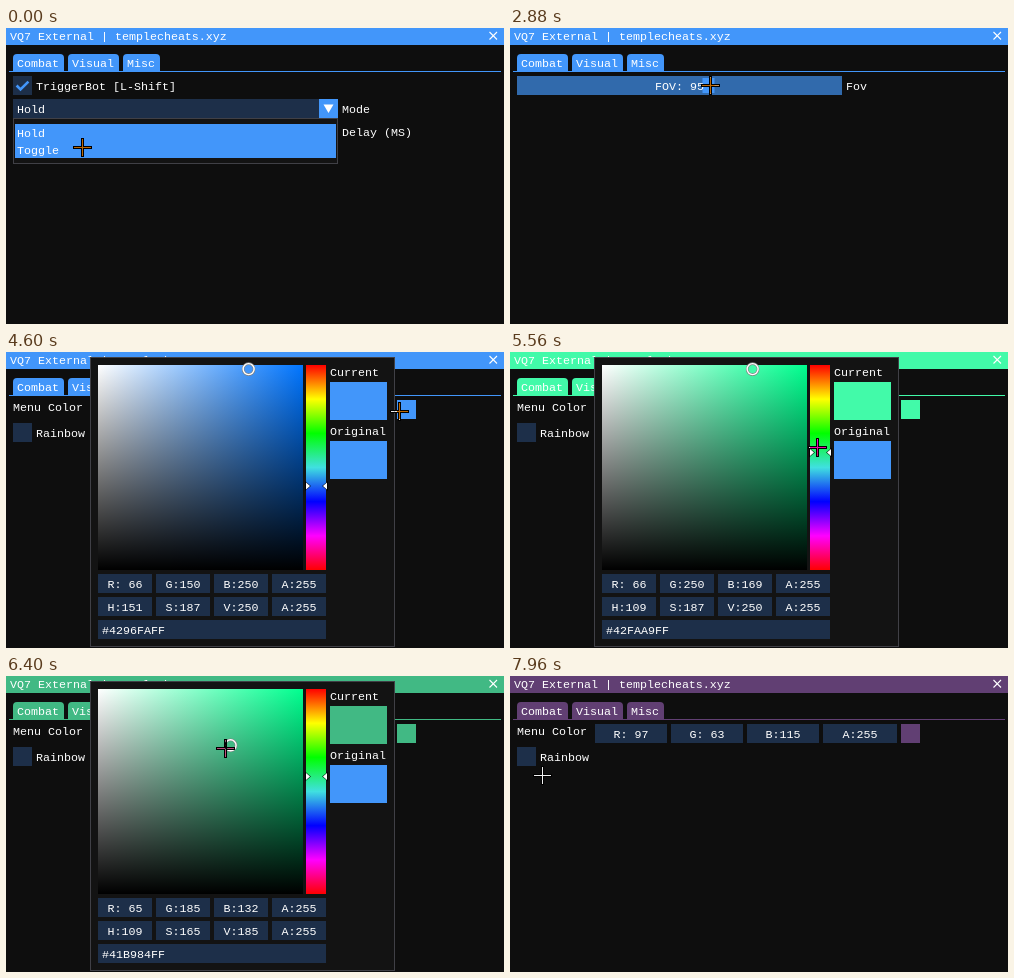
Animation of 498 by 296 pixels, one loop 8000 ms. Source, as an HTML page with a canvas:

```html
<!DOCTYPE html>
<html lang="en">
<head>
<meta charset="utf-8">
<title>Settings menu</title>
<style>
html, body { margin: 0; width: 100%; height: 100%; overflow: hidden; background: #0e0e0e; }
canvas { display: block; }
</style>
</head>
<body>
<canvas id="stage" width="498" height="296"></canvas>
<script>
const ctx = document.getElementById('stage').getContext('2d');
const LOOP = 8000;
const BG = '#0e0e0e', POPUP = '#131313', BORDER = '#404046';
const FRAME = '#1d2f49', HOVER = '#24456d', ACTIVE = '#316aac';
const ROW = 19, STEP = 23, CHAR = 7;
const SV = { x: 92, y: 13, size: 205 };
const BASE_HSV = [.5903, .7347, .98];

// Pointer visits: arrival time, x, y. Each move takes at most TRAVEL ms.
const TRAVEL = 400;
const VISITS = [
  [0, 77, 120], [400, 62, 105], [960, 19, 52], [1600, 86, 34],
  [2160, 150, 58], [2600, 262, 60], [2880, 200, 57], [3320, 136, 35],
  [4360, 393, 59], [5400, 310, 134], [5520, 308, 100.5], [5560, 307, 95.5],
  [6000, 242.6, 17.1], [6360, 224.6, 69.3], [6400, 220, 72], [6700, 184.7, 125.5],
  [7000, 310, 100.5], [7320, 310, 172], [7880, 36, 113], [7960, 32, 99]
];
const DRAGS = [
  { part: 'hue', from: 5400, to: 5520 },
  { part: 'sv', from: 6000, to: 6700 },
  { part: 'hue', from: 7000, to: 7320 }
];
const LAG = 40;
const TIMES = { choose: 400, uncheck: 1040, visual: 1600, grab: 2160, release: 2920,
                misc: 3320, open: 4360, close: 7860 };

const clamp = (v, lo, hi) => Math.max(lo, Math.min(hi, v));

function pointerAt(t) {
  const i = VISITS.findIndex(v => v[0] > t);
  const [t1, x1, y1] = VISITS[i < 0 ? VISITS.length - 1 : i];
  if (i <= 0) return { x: x1, y: y1 };
  const [t0, x0, y0] = VISITS[i - 1];
  const span = Math.min(TRAVEL, t1 - t0);
  const u = clamp((t - t1 + span) / span, 0, 1);
  const e = u * u * (3 - 2 * u);
  return { x: x0 + (x1 - x0) * e, y: y0 + (y1 - y0) * e };
}

// The colour follows the pointer through every drag so far.
function colorAt(t) {
  let [h, s, v] = BASE_HSV;
  for (const { part, from, to } of DRAGS) {
    if (t - LAG < from) break;
    const p = pointerAt(Math.min(t - LAG, to));
    const down = clamp((p.y - SV.y) / SV.size, 0, 1);
    if (part === 'hue') h = down;
    else [s, v] = [clamp((p.x - SV.x) / SV.size, 0, 1), 1 - down];
  }
  return [h, s, v];
}

function hsvToRgb(h, s, v) {
  return [5, 3, 1].map(n => {
    const k = (n + h * 6) % 6;
    return Math.round(255 * (v - v * s * clamp(Math.min(k, 4 - k), 0, 1)));
  });
}

const css = rgb => `rgb(${rgb})`;
const BASE = css(hsvToRgb(...BASE_HSV));

function rect(x, y, w, h, fill) {
  ctx.fillStyle = fill;
  ctx.fillRect(x, y, w, h);
}

function panel(x, y, w, h) {
  rect(x, y, w, h, BORDER);
  rect(x + 1, y + 1, w - 2, h - 2, POPUP);
}

function text(str, x, y) {
  ctx.fillStyle = '#fff';
  ctx.fillText(str, x, y);
}

function line(points, color, width) {
  ctx.beginPath();
  points.forEach(([x, y]) => ctx.lineTo(x, y));
  ctx.strokeStyle = color;
  ctx.lineWidth = width;
  ctx.stroke();
}

// Triangle with its tip at x + dx, y + dy.
function arrow(x, y, dx, dy, half, fill) {
  const nx = dy ? half : 0, ny = dx ? half : 0;
  ctx.beginPath();
  ctx.moveTo(x - nx, y - ny);
  ctx.lineTo(x + dx, y + dy);
  ctx.lineTo(x + nx, y + ny);
  ctx.fillStyle = fill;
  ctx.fill();
}

function field(x, y, w, label, fill = FRAME) {
  rect(x, y, w, ROW, fill);
  text(label, x + (w - label.length * CHAR) / 2, y + 14);
}

function slider(y, label, value, ratio, ui, held) {
  rect(7, y, 325, ROW, held ? ACTIVE : ui.over(7, y, 325, ROW) ? HOVER : FRAME);
  rect(9 + ratio * 309, y + 2, 12, ROW - 4, ui.color);
  text(value, 169.5 - value.length * CHAR / 2, y + 14);
  text(label, 336, y + 14);
}

function checkbox(y, label, on, ui) {
  rect(7, y, ROW, ROW, ui.over(7, y, ROW, ROW) ? HOVER : FRAME);
  if (on) line([[10.6, y + 9.5], [14.5, y + 13.4], [22.4, y + 5.6]], ui.color, 2.6);
  text(label, 30, y + 14);
}

function drawWindow(ui) {
  rect(0, 0, 498, 296, BG);
  rect(0, 0, 498, 17, ui.color);
  text('VQ7 External | templecheats.xyz', 4, 12);
  line([[483.5, 4], [491, 11.5]], '#fff', 1.1);
  line([[491, 4], [483.5, 11.5]], '#fff', 1.1);

  let x = 7;
  for (const name of ['Combat', 'Visual', 'Misc']) {
    const w = name.length * CHAR + 9;
    ctx.beginPath();
    ctx.roundRect(x, 26, w, 17, [4, 4, 0, 0]);
    ctx.fillStyle = ui.color;
    ctx.fill();
    text(name, x + 4, 39);
    x += w + 4;
  }
  rect(3, 43, 492, 1, ui.color);
}

function drawCombat(t, ui) {
  const enabled = t < TIMES.uncheck;
  checkbox(48, 'TriggerBot [L-Shift]', enabled, ui);
  rect(7, 71, 325, ROW, FRAME);
  rect(313, 71, ROW, ROW, ui.color);
  arrow(322.5, 76.5, 0, 8.5, 5, '#fff');
  text('Hold', 11, 85);
  text('Mode', 336, 85);
  if (enabled) slider(94, 'Delay (MS)', 'Delay: 0', 0, ui, false);
  if (t < TIMES.choose) {
    panel(7, 90, 325, 46);
    rect(9, 96, 321, 17, ui.color);
    if (ui.over(9, 113, 321, 17)) rect(9, 113, 321, 17, ui.color);
    text('Hold', 11, 109);
    text('Toggle', 11, 126);
  }
}

function drawVisual(t, ui) {
  const held = t >= TIMES.grab && t < TIMES.release;
  const { x } = pointerAt(clamp(t, TIMES.grab, TIMES.release));
  const fov = Math.round((x - 16.5) / 309 * 160);
  slider(48, 'Fov', 'FOV: ' + fov, fov / 160, ui, held);
}

const channel = (name, n) => name + ':' + String(n).padStart(3);

function drawMisc(ui) {
  text('Menu Color', 7, 59);
  [...ui.rgb, 255].forEach((n, i) => {
    field(85 + i * 76, 48, i < 3 ? 72 : 74, channel('RGBA'[i], n));
  });
  rect(391, 48, ROW, ROW, ui.color);
  checkbox(71, 'Rainbow', false, ui);
}

function gradient(x, y, x2, y2, stops) {
  const g = ctx.createLinearGradient(x, y, x2, y2);
  stops.forEach((c, i) => g.addColorStop(i / (stops.length - 1), c));
  return g;
}

function drawPicker(ui) {
  const { x, y, size } = SV;
  const [h, s, v] = ui.hsv;
  panel(84, 5, 305, 290);

  const pure = css(hsvToRgb(h, 1, 1));
  rect(x, y, size, size, gradient(x, 0, x + size, 0, ['#fff', pure]));
  rect(x, y, size, size, gradient(0, y, 0, y + size, ['rgba(0,0,0,0)', '#000']));
  const hues = ['#f00', '#ff0', '#0f0', '#40e0e0', '#00f', '#f0f', '#f00'];
  rect(300, y, 20, size, gradient(0, y, 0, y + size, hues));

  const hy = y + size * h;
  for (const [ax, d] of [[300, 1], [321, -1]]) {
    arrow(ax - d, hy, 6 * d, 0, 5, 'rgba(0,0,0,.8)');
    arrow(ax, hy, 4 * d, 0, 3.5, '#fff');
  }

  ctx.beginPath();
  ctx.arc(x + size * s, y + size * (1 - v), 5.5, 0, 7);
  ctx.fillStyle = ui.color;
  ctx.fill();
  for (const [color, width] of [['#808080', 2.6], ['#fff', 1.4]]) {
    ctx.strokeStyle = color;
    ctx.lineWidth = width;
    ctx.stroke();
  }

  [['Current', ui.color], ['Original', BASE]].forEach(([label, fill], i) => {
    text(label, 324, 24 + i * 59);
    rect(324, 30 + i * 59, 57, 38, fill);
  });

  const rowY = y + size + 4;
  const hsv = ui.hsv.map(n => Math.round(n * 255));
  [['RGBA', ui.rgb], ['HSVA', hsv]].forEach(([names, nums], row) => {
    [...nums, 255].forEach((n, i) => {
      field(x + i * 58, rowY + row * STEP, 54, channel(names[i], n));
    });
  });
  const hex = [...ui.rgb, 255].map(n => n.toString(16).padStart(2, '0')).join('');
  rect(x, rowY + 2 * STEP, 228, ROW, FRAME);
  text('#' + hex.toUpperCase(), x + 4, rowY + 2 * STEP + 14);
}

// A plus built from one quarter turned four times.
function plus(cx, cy, r, w) {
  const path = new Path2D();
  let quarter = [[r, -w], [r, w], [w, w]];
  for (let i = 0; i < 4; i++) {
    quarter.forEach(([a, b]) => path.lineTo(cx + a, cy + b));
    quarter = quarter.map(([a, b]) => [-b, a]);
  }
  path.closePath();
  return path;
}

// Crosshair: black rim, centre inverts what lies below.
function drawPointer(ui) {
  const x = Math.floor(ui.x) + .5, y = Math.floor(ui.y) + .5;
  const core = plus(x, y, 8.5, .5), rim = plus(x, y, 9.5, 1.5);
  rim.addPath(core);
  ctx.fillStyle = '#000';
  ctx.fill(rim, 'evenodd');
  ctx.globalCompositeOperation = 'difference';
  ctx.fillStyle = '#fff';
  ctx.fill(core);
  ctx.globalCompositeOperation = 'source-over';
}

function draw(t) {
  const { x, y } = pointerAt(t);
  const hsv = colorAt(t);
  const rgb = hsvToRgb(...hsv);
  const over = (l, top, w, h) => x >= l && x < l + w && y >= top && y < top + h;
  const ui = { x, y, hsv, rgb, color: css(rgb), over };

  ctx.font = '11.66px "Liberation Mono", monospace';
  drawWindow(ui);
  if (t < TIMES.visual) drawCombat(t, ui);
  else if (t < TIMES.misc) drawVisual(t, ui);
  else drawMisc(ui);
  if (t >= TIMES.open && t < TIMES.close) drawPicker(ui);
  drawPointer(ui);
}

const start = performance.now();
function tick() {
  draw((performance.now() - start) % LOOP);
  requestAnimationFrame(tick);
}
tick();
</script>
</body>
</html>
```
